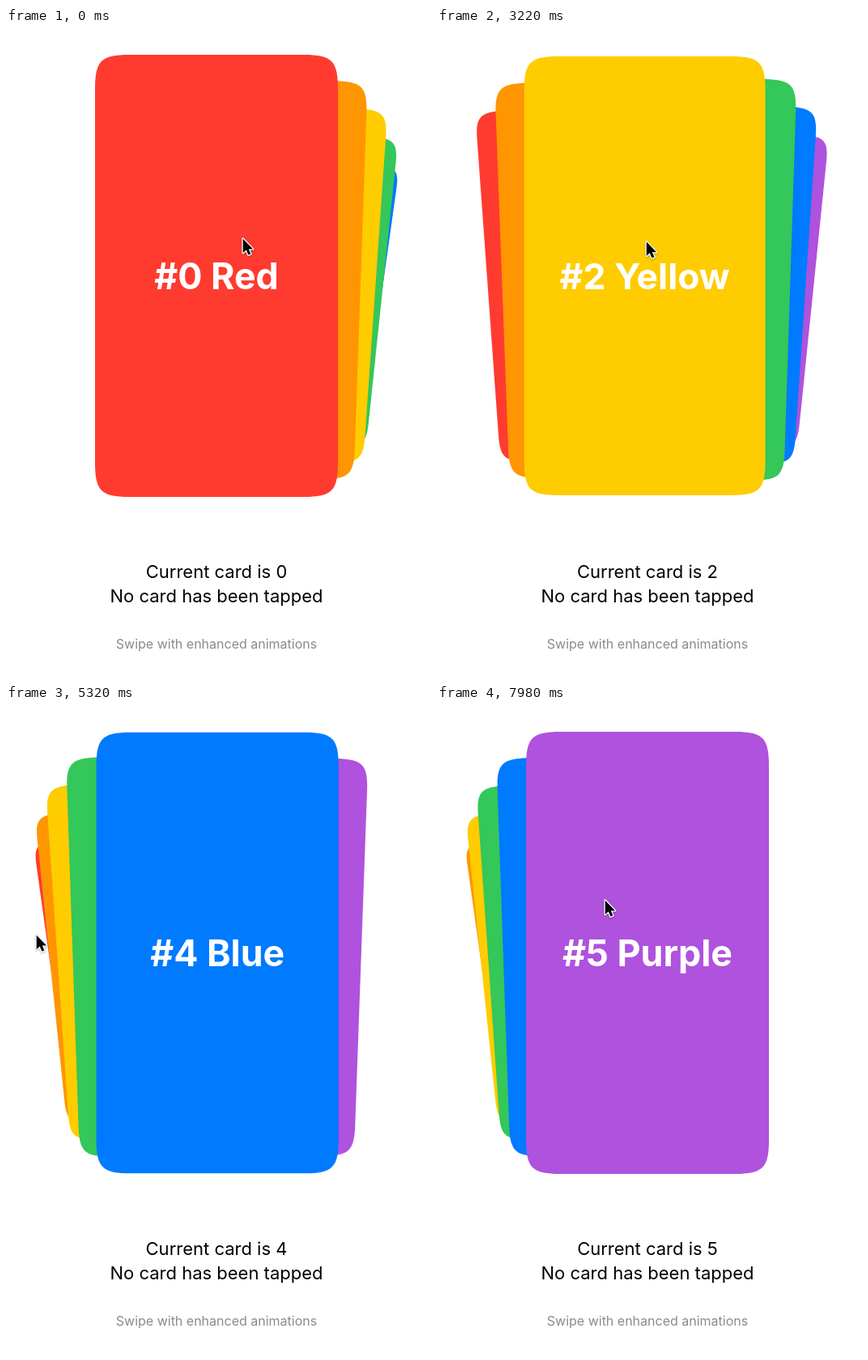
An HTML page that plays this animation: 525x800 px, repeating every 8 s.

```html
<!DOCTYPE html>
<html lang="en">
<head>
<meta charset="utf-8">
<title>Card deck</title>
<style>
  html, body { margin: 0; width: 100%; height: 100%; overflow: hidden; background: #fff; }
  svg { display: block; width: 525px; height: 800px; }
  text { font: 22px Inter, sans-serif; text-anchor: middle; }
  .title { font-size: 44.8px; font-weight: 700; fill: #fff; }
  .hint { font-size: 16px; fill: #8a8a8e; }
  #cursor path { fill: #000; stroke: #fff; stroke-width: 3; stroke-linejoin: round; paint-order: stroke; }
  #cursor { filter: drop-shadow(0 1px 1px rgba(0, 0, 0, .3)); }
</style>
</head>
<body>
<svg viewBox="0 0 525 800">
  <g id="deck"></g>
  <text id="before" x="260" y="678"></text>
  <text id="after" x="260" y="678"></text>
  <text x="260" y="708">No card has been tapped</text>
  <text class="hint" x="260" y="765">Swipe with enhanced animations</text>
  <g id="cursor"><path transform="scale(.88)" d="M0 0V20L4.6 15.8 7.6 22.8 11 21.4 8 14.6H14Z"/></g>
</svg>
<script>
const LOOP = 8000, STEP = 70, SPACING = 48;
const CARDS = [
  ['Red', '#ff3b30'], ['Orange', '#ff9500'], ['Yellow', '#ffcc00'],
  ['Green', '#34c759'], ['Blue', '#007aff'], ['Purple', '#af52de']
];
// The pointer drags to `reach` while the deck turns one card, then returns to `rest`
const HOME = [292, 258];
const SWIPES = [
  { start: 70, span: 993, reach: [50, 280], rest: [270, 260] },
  { start: 1610, span: 948, reach: [40, 270], rest: [285, 260] },
  { start: 3080, span: 858, reach: [26, 277], rest: [285, 260] },
  { start: 4550, span: 849, reach: [37, 282], rest: [270, 248] },
  { start: 6230, span: 946, reach: [38, 258], rest: [207, 239] }
];

const $ = id => document.getElementById(id);
const clamp = v => Math.min(1, Math.max(0, v));
const smooth = (a, b, v) => { const t = clamp((v - a) / (b - a)); return t * t * (3 - 2 * t); };

// Rectangle centred on the origin; each corner is one cubic that starts well before the bend
function cardPath(w, h, bend, pull) {
  const x = w / 2, y = h / 2;
  const corner = (sx, sy) => {
    const along = d => `${sx * (x - d)} ${sy * y}`, down = d => `${sx * x} ${sy * (y - d)}`;
    const curve = [along(bend), along(pull), down(pull), down(bend)];
    if (sx !== sy) curve.reverse();
    return `${curve[0]}C${curve.slice(1)}`;
  };
  return `M${corner(-1, 1)}L${corner(-1, -1).split('C')[0] && cornerFrom(corner(-1, -1))}`;
}

function roundedPath(w, h, bend, pull) {
  const x = w / 2, y = h / 2, near = [x - bend, y - bend], ctrl = [x - pull, y - pull];
  return `M${-near[0]} ${-y}H${near[0]}C${ctrl[0]} ${-y} ${x} ${-ctrl[1]} ${x} ${-near[1]}` +
    `V${near[1]}C${x} ${ctrl[1]} ${ctrl[0]} ${y} ${near[0]} ${y}` +
    `H${-near[0]}C${-ctrl[0]} ${y} ${-x} ${ctrl[1]} ${-x} ${near[1]}` +
    `V${-near[1]}C${-x} ${-ctrl[1]} ${-ctrl[0]} ${-y} ${-near[0]} ${-y}Z`;
}

const shape = roundedPath(300, 545, 42, 7.5);
$('deck').innerHTML = CARDS.map(([name, color], i) =>
  `<g><path d="${shape}" fill="${color}"/><text class="title" y="16.5">#${i} ${name}</text></g>`).join('');
const cards = [...$('deck').children];

function pointerAt(t, axis) {
  let from = HOME[axis], at = from;
  for (const { start, reach, rest } of SWIPES) {
    at += (reach[axis] - from) * smooth(start, start + 700, t);
    at += (rest[axis] - reach[axis]) * smooth(start + 840, start + 1330, t);
    from = rest[axis];
  }
  return at;
}

function placeCard(card, offset) {
  const dist = Math.abs(offset);
  const angle = 2 * offset * smooth(.4, .7, dist);
  card.setAttribute('transform',
    `translate(260 305.5) rotate(${angle}) scale(${1 - .1 * dist}) translate(${offset * SPACING})`);
}

function render(t) {
  const progress = SWIPES.reduce((sum, { start, span }) => sum + smooth(start, start + span, t), 0);
  const distance = i => Math.abs(i - progress);
  cards.forEach((card, i) => placeCard(card, i - progress));
  const order = [...cards.keys()].sort((a, b) => distance(b) - distance(a));
  $('deck').append(...order.map(i => cards[i]));

  const page = Math.floor(progress);
  const fade = clamp((progress - page - .45) / .15);
  $('before').textContent = `Current card is ${page}`;
  $('after').textContent = `Current card is ${page + 1}`;
  $('before').style.opacity = Math.sqrt(1 - fade);
  $('after').style.opacity = Math.sqrt(fade);

  $('cursor').setAttribute('transform', `translate(${pointerAt(t, 0) + .7} ${pointerAt(t, 1) + 1.7})`);
}

function tick() {
  render(Math.floor(performance.now() % LOOP / STEP) * STEP);
  requestAnimationFrame(tick);
}
tick();
</script>
</body>
</html>
```
